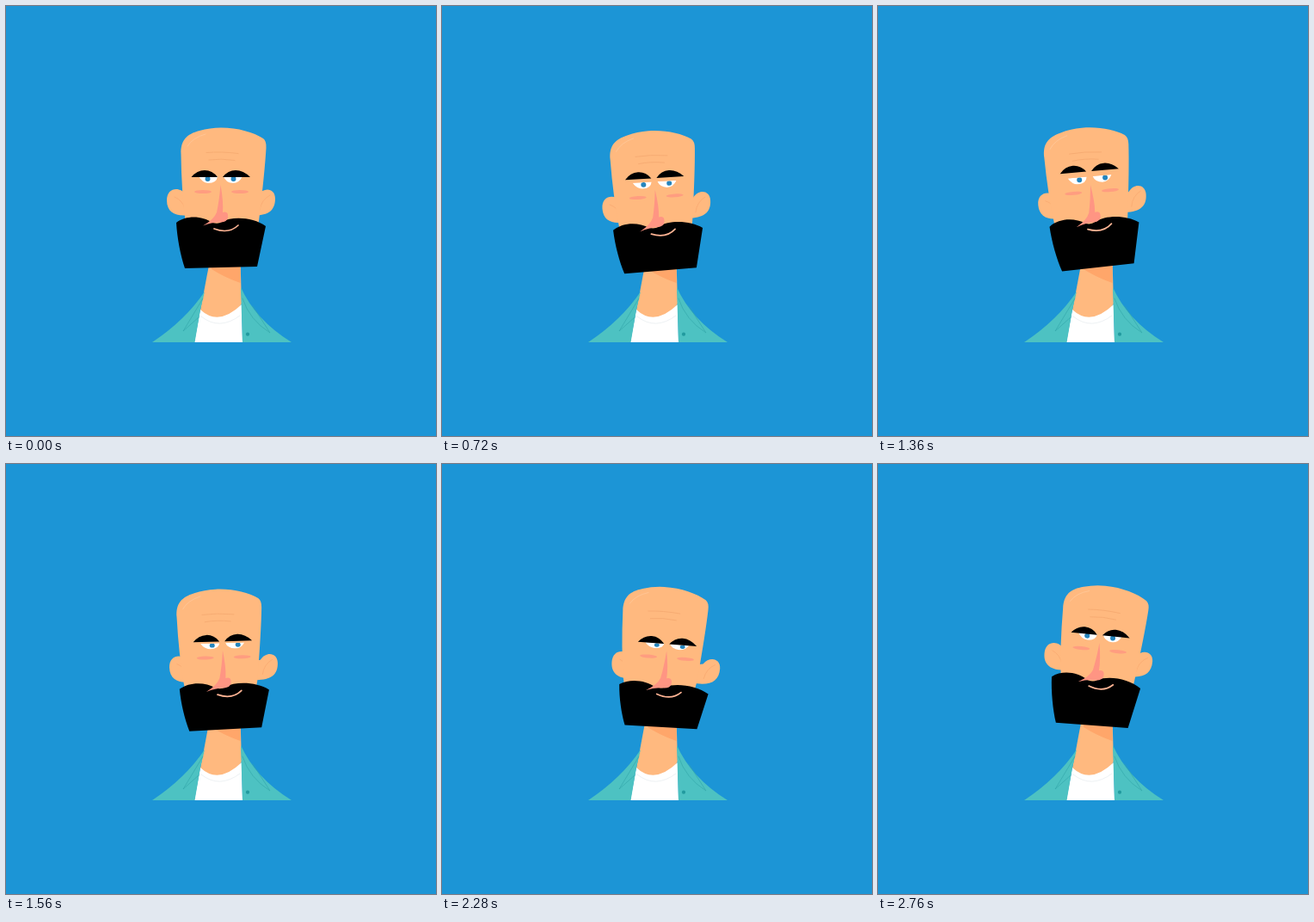
Recreate the animation shown at these times as an HTML page. Size 500 px wide and 500 px high, loop 2.84 s.

```html
<!DOCTYPE html>
<html lang="en">
<head>
<meta charset="utf-8">
<title>Bearded man</title>
<style>
  html, body { margin: 0; width: 100%; height: 100%; overflow: hidden; background: #1c95d6; }
  svg { display: block; width: 100%; height: 100%; }
  .skin { fill: #ffb97f; }
  .line { fill: none; stroke-linecap: round; }
</style>
</head>
<body>
<svg viewBox="0 0 500 500">
  <clipPath id="lids">
    <path d="M224 198H246Q245 206 235 206Q228 205 224 198ZM253 198H275Q271 206 264 206Q255 205 253 198Z"/>
  </clipPath>

  <!-- body -->
  <path class="skin" d="M237 296L226 354Q236 366 249 364Q266 361 274 346L272.500 296Z"/>
  <path fill="#ffa66a" d="M239 300H272.500V322Q255 316 239 306Z"/>
  <path fill="#fff" d="M226 353Q247 373 274 347L275 391H219Z"/>
  <path class="line" stroke="#e9eef0" stroke-width=".8" d="M227 361Q248 378 272 360"/>
  <path fill="#4dc2c2" d="M231 332Q209 365 170 391H219.500L226 353Z"/>
  <path fill="#4dc2c2" d="M273 327Q290 365 332 391H275Z"/>
  <path class="line" stroke="#31a5a8" stroke-width=".6" d="M229 340L206 378L224 362M275 340Q283 365 307 380L287 349"/>
  <circle cx="281" cy="381.700" r="2.100" fill="#229a9f"/>

  <!-- head -->
  <g id="ears">
    <path class="skin" d="M218 222L209 219C203 210 187 210 187 226C187 243 202 246 218 242Z"/>
    <path class="skin" d="M282 222L293 220C300 210 313 212 313 224C313 240 302 245 282 243Z"/>
    <path class="line" stroke="#f9a870" stroke-width=".7" d="M196 222Q205 226 208 235M307 220Q297 225 295 237"/>
  </g>
  <g id="skull">
    <path class="skin" d="M203.500 172C203 156 210 149 225 145Q237 141.500 250 141.500C270 141.500 288 147 299 154Q303 157 302.500 165Q301 192 294 250L290 268H212L208.500 250Q204 215 203.500 172Z"/>
    <path class="line" stroke="#f3a66e" stroke-width=".7" d="M233 170.500Q250 169 270 171.500M236 179Q250 177 266 179.500"/>
    <path class="line" stroke="#ffcda3" stroke-width=".6" d="M211 163Q217 153 232 149"/>
  </g>
  <g id="face">
    <g fill="#ff9d80">
      <ellipse cx="229" cy="216" rx="10" ry="2"/>
      <ellipse cx="272" cy="216" rx="10" ry="2"/>
    </g>
    <g id="eyes">
      <g clip-path="url(#lids)">
        <path fill="#fff" d="M220 195H280V210H220Z"/>
        <g id="pupils" fill="#2585bd" stroke="none">
          <circle cx="234.500" cy="201" r="3"/>
          <circle cx="264.500" cy="201" r="3"/>
        </g>
      </g>
    </g>
    <path id="brows" d="M215.500 199Q222 191 231 191Q240 191 246 199ZM252 199Q258 191 267 191Q276 191 284 199Z"/>
  </g>
  <path id="beard" d="M198 252C210 243 228 244 240 252Q247 254 251 251C264 244 288 246 302 256L292 303L208 305C203 290 199 270 198 252Z"/>
  <g id="nose">
    <path fill="#ff9583" d="M249.500 208Q253 228 252 240Q259 238 258 246Q257 251 250 251.500Q240 251 229 255.500Q242 248 245 240Q248 226 249.500 208Z"/>
    <path class="line" stroke="#ffb494" stroke-width="1.700" d="M242 259Q259 265.500 270 255"/>
  </g>
</svg>
<script>
const LOOP = 2840, STEP = 40, MOVE = 500, CHIN = 291;

// Each move starts at a time and ends in a pose: tilt in degrees, turn and nod in pixels.
const moves = [
  { at: 400, tilt: -5, turn: 4.7, nod: 0 },
  { at: 1360, tilt: 4.4, turn: 5.3, nod: 7.5 },
  { at: 2260, tilt: 5.5, turn: 0, nod: 0 }
];

const smooth = u => u * u * (3 - 2 * u);

function poseAt(t) {
  const pose = { tilt: 0, turn: 0, nod: 0, dip: 0 };
  for (const move of moves) {
    const u = Math.min(1, Math.max(0, (t - move.at) / MOVE));
    for (const key of ["tilt", "turn", "nod"]) pose[key] += (move[key] - pose[key]) * smooth(u);
    pose.dip += Math.sin(Math.PI * u);
  }
  return pose;
}

function set(id, transform) {
  document.getElementById(id).setAttribute("transform", transform);
}

// Leans a part around the chin, so that higher parts swing further.
function lean(id, y, angle, dx, dy, squash = 1) {
  const swing = (CHIN - y) * angle * Math.PI / 180;
  set(id, `translate(${250 + swing + dx} ${y + dy}) rotate(${angle}) scale(1 ${squash}) translate(-250 ${-y})`);
}

function draw(now) {
  const t = Math.floor(now % LOOP / STEP) * STEP;
  const { tilt, turn, nod: look, dip } = poseAt(t);
  const nod = look + 2.3 * dip;
  const bob = 4 * dip + 0.12 * look;

  lean("skull", 200, tilt - 0.15 * nod, 0, bob);
  for (const id of ["ears", "face", "nose"]) lean(id, 228, tilt, turn, bob + nod);
  lean("beard", 279, tilt, turn, bob + 0.45 * nod, 1 - 0.015 * nod);

  set("brows", `translate(0 ${1.4 * Math.min(0, tilt) + 0.15 * nod})`);
  set("eyes", `translate(0 206) scale(1 ${1 - 0.03 * nod}) translate(0 -206)`);
  set("pupils", `translate(${0.6 * turn} 0)`);
}

const start = performance.now();
function tick() {
  draw(performance.now() - start);
  requestAnimationFrame(tick);
}
tick();
</script>
</body>
</html>
```
